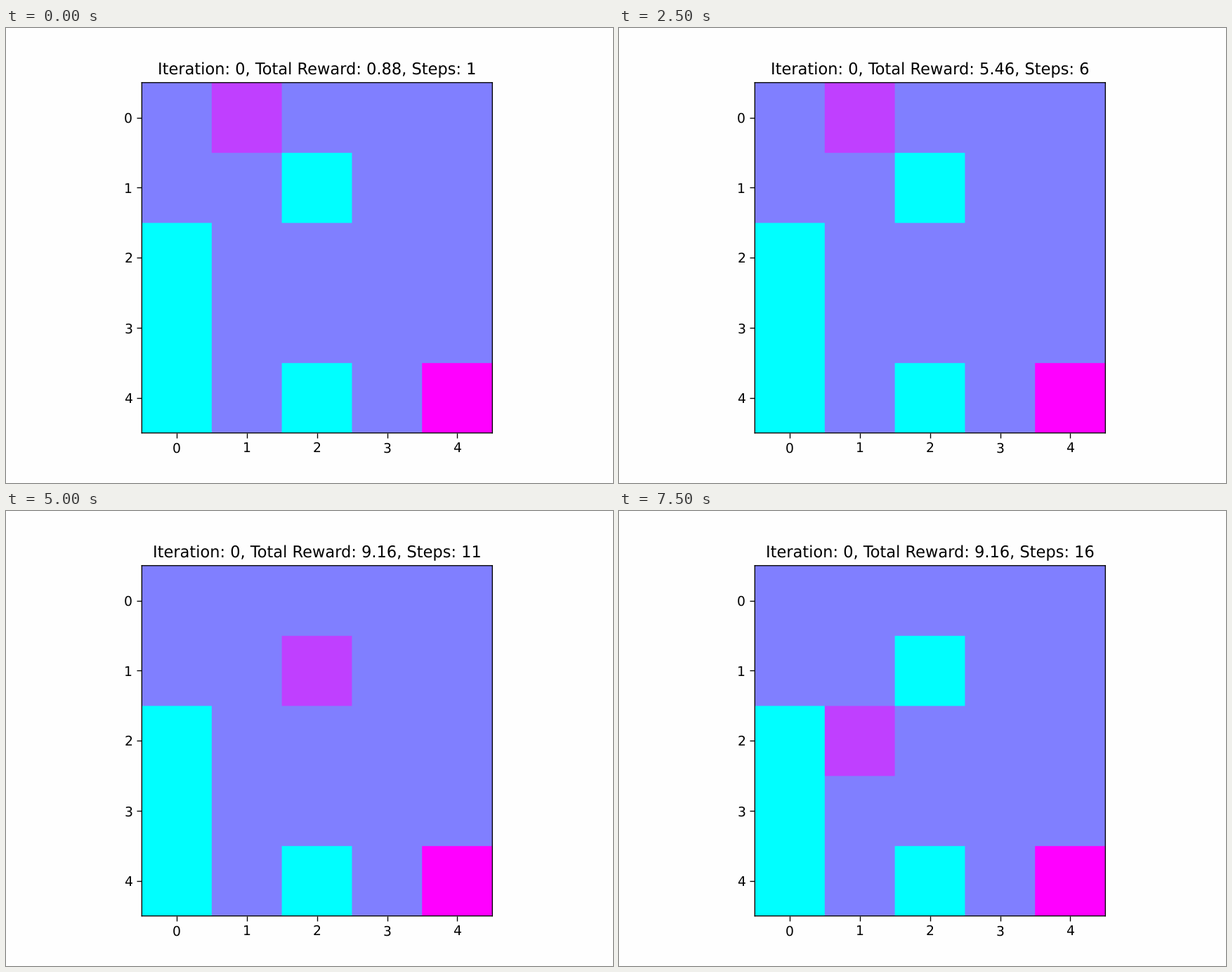
Recreate the animation shown at these times as a matplotlib script. Size 864x648 px, loop 8000 ms.

```python
import numpy as np
import matplotlib.pyplot as plt
from matplotlib.animation import FuncAnimation

SIZE = 5
CELL_PX = 148
STEP_MS = 500
LINE = 0.72
TOP, MID, SIDE, LOW = (0, 1), (1, 1), (1, 2), (2, 1)

# The agent visits the left edge, circles twice, then paces up and down
path = [TOP, MID, TOP, (1, 0), (0, 0)]
path += 2 * [TOP, MID, SIDE] + [TOP, MID] + [LOW, MID, LOW]

# Reward grows almost evenly, then stalls
steps = np.arange(1, len(path) + 1)
totals = np.interp(steps, [1, 4, 6, 9, 10], [0.88, 3.62, 5.46, 8.25, 9.16])

board = np.zeros((SIZE, SIZE))
board[2:, 0] = board[[1, 4], 2] = -1
board[-1, -1] = 1


def draw_board(agent):
    """Place the agent and enlarge the cells so their edges are antialiased."""
    grid = board.copy()
    grid[agent] = 0.5
    return np.kron(grid, np.ones((CELL_PX, CELL_PX)))


plt.rcParams.update({"text.hinting": "none", "xtick.major.width": LINE,
                     "ytick.major.width": LINE, "axes.linewidth": LINE})
fig, ax = plt.subplots(figsize=(6.4, 4.8), dpi=135, facecolor="#fefefe")
image = ax.imshow(draw_board(path[0]), cmap="cool", vmin=-1, vmax=1,
                  interpolation="antialiased",
                  extent=(-0.5, SIZE - 0.5, SIZE - 0.5, -0.5))
ax.set_xticks(range(SIZE))
ax.set_yticks(range(SIZE))
title = ax.set_title("")

for line in [*ax.spines.values(), *ax.get_xticklines(), *ax.get_yticklines()]:
    line.set_snap(False)


def update(i):
    image.set_data(draw_board(path[i]))
    title.set_text(f"Iteration: 0, Total Reward: {totals[i]:.2f}, "
                   f"Steps: {steps[i]}")
    return image, title


anim = FuncAnimation(fig, update, frames=len(path), interval=STEP_MS,
                     repeat=True, repeat_delay=0, blit=False)
plt.show()
```
